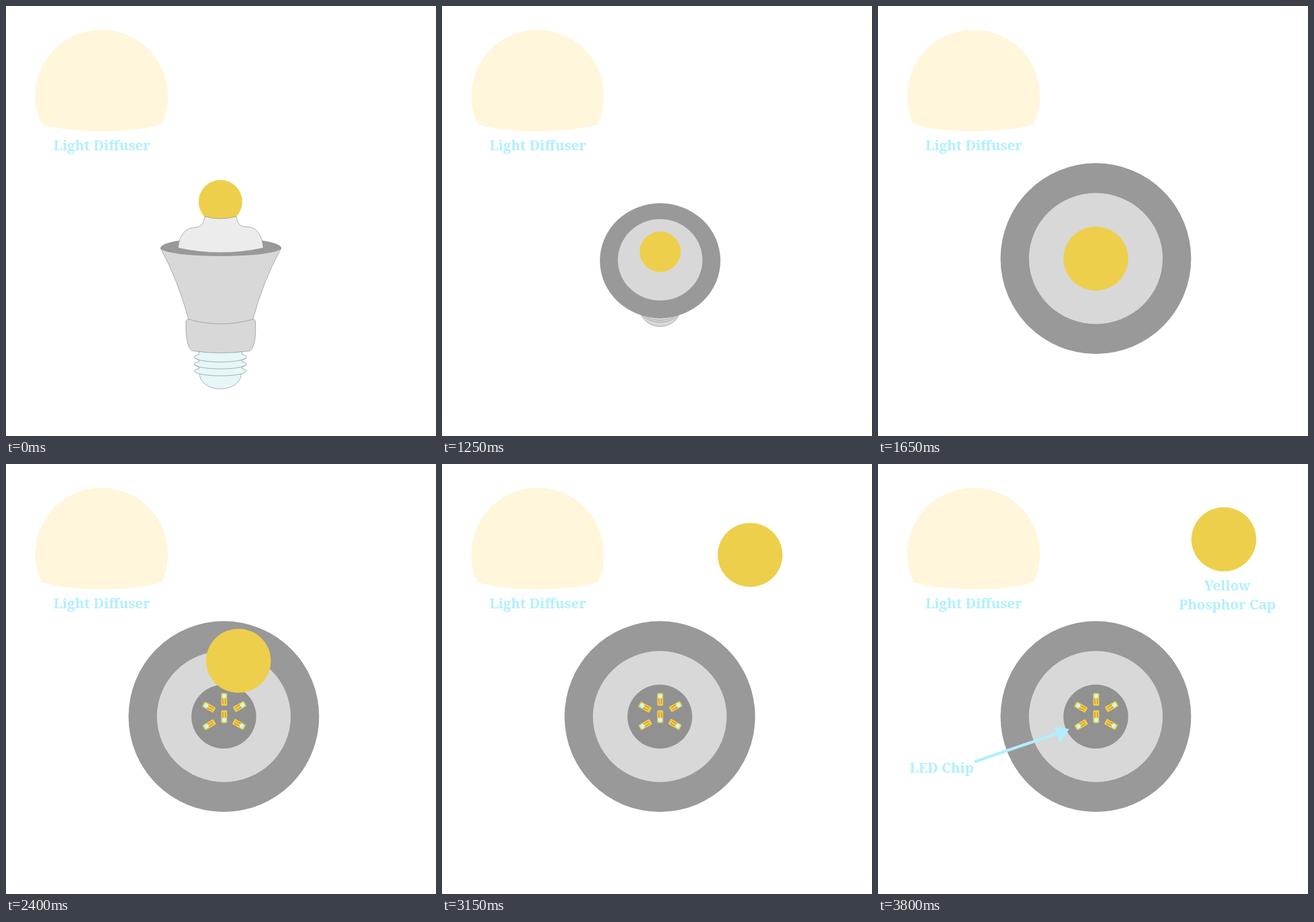
Animation, 749 px wide and 748 px high, one loop 6800 ms. Source, as an HTML page:

```html
<!DOCTYPE html>
<html lang="en">
<head>
<meta charset="utf-8">
<title>LED bulb parts</title>
<style>
  html, body { margin: 0; width: 100%; height: 100%; overflow: hidden; background: #fff; }
  svg { display: block; width: 100%; height: 100%; }
  text { font: bold 24px "Noto Serif", serif; text-anchor: middle; fill: #b0efff; }
  .line { stroke: #999; stroke-width: .9; }
  .grey { fill: #d8d8d8; }
  .dark { fill: #999; }
  .glass { fill: #e6f6f9; }
  .yellow { fill: #edcf4c; }
</style>
</head>
<body>
<svg viewBox="0 0 749 748">
  <defs>
    <g id="chip">
      <rect class="yellow" x="-5.2" y="-11" width="10.4" height="22" rx="1.8"/>
      <path d="M-2.6-2C-4 3 0 3-2.6 8M2.4-2C.6 3 4 3 1.8 8" fill="none" stroke="#d9782b" stroke-width="1.1"/>
      <circle cy="-5.5" r="3.7" fill="#cbf8f3"/>
    </g>
  </defs>

  <path d="M62 206A115.5 115.5 0 1 1 271 206Q229 218 166.500 218Q104 218 62 206Z" fill="#fff6dc"/>
  <text x="167" y="251">Light Diffuser</text>

  <g id="upright">
    <g class="glass line">
      <path d="M337 639C339 675 408 675 410 639Z"/>
      <path d="M336 601V606Q328 608 328 611Q328 613 336 616V619Q328 620 328 623Q328 625 336 628V631Q328 632 328 635C333 646 414 646 419 635Q419 632 411 631V628Q419 625 419 623Q419 620 411 619V616Q419 613 419 611Q419 608 411 606V601Z"/>
      <path d="M328 611C333 622 414 622 419 611M328 623C333 634 414 634 419 623" fill="none"/>
    </g>
    <path class="grey line" d="M318 545Q313 545 313.500 552C313 575 316 598 326 600Q374 607 424 600C432 598 436 575 434.500 552Q435 545 430 545Z"/>
    <path class="grey line" d="M269 421Q300 478 318 545Q374 561 430 545Q448 478 479.500 421Z"/>
    <path class="dark" d="M269 421A105 18 0 0 1 479.500 421A105 14 0 0 1 269 421Z"/>
    <ellipse class="yellow" cx="373.500" cy="340.500" rx="38" ry="38"/>
    <path class="line" fill="#ececec" d="M346 366Q374 374 401 366C404 378 406 384 419 384C438 384 447 402 448 421Q374 437 300 421C301 402 311 386 328 385.500C340 385 345 377 346 366Z"/>
  </g>

  <g id="tilted">
    <g id="base" class="line">
      <ellipse id="tip" rx="36"/>
      <ellipse id="thread3" rx="45"/>
      <ellipse id="thread2" rx="45"/>
      <ellipse id="thread1" rx="45"/>
    </g>
    <path id="collar" class="grey line"/>
    <path id="cone" class="grey line"/>
    <ellipse id="rim" class="dark" rx="105"/>
    <path id="cap" class="grey line"/>
  </g>

  <g id="chips">
    <ellipse cx="379.400" cy="439.400" rx="56.400" ry="55.600" fill="#919191"/>
    <use href="#chip" transform="translate(380 409.500)"/>
    <use href="#chip" transform="translate(380 439.500) rotate(180)"/>
    <use href="#chip" transform="translate(353.500 423) rotate(-60)"/>
    <use href="#chip" transform="translate(407 422) rotate(60)"/>
    <use href="#chip" transform="translate(354 453.500) rotate(-120)"/>
    <use href="#chip" transform="translate(405.800 453) rotate(120)"/>
  </g>

  <g id="ball">
    <ellipse class="yellow" rx="35.700" ry="35.200"/>
    <path id="seam" class="line" fill="none" d="M-28 25Q0 44 28 25"/>
  </g>

  <g id="labels">
    <text x="608.500" y="220">Yellow</text>
    <text x="608.500" y="253">Phosphor Cap</text>
    <text x="111" y="537">LED Chip</text>
    <path d="M168 518L316 467.500" stroke="#b0efff" stroke-width="5"/>
    <path d="M333 461L304 457Q311 463 312 469Q314 476 316 486Z" fill="#b0efff"/>
  </g>
</svg>
<script>
const LOOP = 6800, STEP = 50;
const TILT_START = 1000, LIFT_START = 2150;
const TILT_STEPS = 14, FACING_STEP = 8, LIFT_STEPS = 26, FADE_STEPS = 8;
const el = Object.fromEntries([...document.querySelectorAll('[id]')].map(e => [e.id, e]));

const clamp = v => Math.min(1, Math.max(0, v));
const mix = (a, b, t) => a + (b - a) * t;
const set = (e, attrs) => { for (const k in attrs) e.setAttribute(k, attrs[k]); };
const show = (e, on) => { e.style.display = on ? '' : 'none'; };
const stepAt = (time, start) => Math.max(0, Math.floor((time - start) / STEP) + 1);
const bezier = (a, b, c, d, t) => {
  const u = 1 - t;
  return a * u ** 3 + 3 * b * u * u * t + 3 * c * u * t * t + d * t ** 3;
};

// Bulb tipped toward the viewer: rings flatten by sin, heights shorten by cos.
function drawTilt(n) {
  const angle = Math.min(90, 8.25 + 10.65 * n) * Math.PI / 180;
  const s = Math.sin(angle), c = Math.max(0, Math.cos(angle));
  const turn = clamp((n - 1) / 5), settle = clamp((n - 6) / 8);
  const x = mix(mix(373.5, 380, turn), 379.4, settle);
  const y = mix(mix(428, 443, turn), 439.3, settle);
  const scale = mix(1, 1.581, clamp((n - FACING_STEP) / (TILT_STEPS - FACING_STEP)));
  const place = (px, py) => `translate(${px} ${py}) scale(${scale})`;

  set(el.tilted, { transform: place(x, y) });
  show(el.base, n < FACING_STEP);
  show(el.collar, n < FACING_STEP);
  show(el.cone, n < FACING_STEP);

  set(el.base, { fill: n < 5 ? '#e6f6f9' : '#d8d8d8' });
  set(el.tip, { cy: 221 * c ** .85, ry: Math.hypot(35 * s, 16 * c) });
  [187, 199, 210].forEach((h, i) => set(el['thread' + (i + 1)], { cy: h * c, ry: 45 * s }));

  const neck = 120 * c, foot = 179 * c;
  set(el.collar, { d: `M-57 ${neck}C-68 ${neck - 8 * c} -65 ${foot - 18 * c} -45 ${foot}
    A45 ${45 * s} 0 0 0 45 ${foot}C65 ${foot - 18 * c} 68 ${neck - 8 * c} 57 ${neck}Z` });
  set(el.cone, { d: `M-105 0Q-74 ${neck * .45} -57 ${neck}
    A57 ${57 * s} 0 0 0 57 ${neck}Q74 ${neck * .45} 105 0Z` });
  set(el.rim, { ry: 105 * s });

  const capY = -9 * c * c, low = 73.7 * s * mix(1, .978, settle);
  set(el.cap, { d: `M-73.700 ${capY}A73.700 ${Math.hypot(low, 45 * c)} 0 0 1 73.700 ${capY}
    A73.700 ${low} 0 0 1 -73.700 ${capY}Z`, 'stroke-opacity': n < 5 ? 1 : 0 });

  set(el.ball, { transform: place(x, y - 91 * c ** 1.5 * scale) });
}

function draw(time) {
  const tilt = Math.min(TILT_STEPS, stepAt(time, TILT_START));
  const lift = stepAt(time, LIFT_START);
  show(el.upright, !tilt);
  show(el.tilted, tilt);
  show(el.ball, tilt);
  show(el.seam, tilt < 3);
  show(el.chips, lift);
  if (tilt) drawTilt(tilt);
  if (lift) {
    const t = clamp(lift / LIFT_STEPS);
    const x = bezier(379.4, 405, 479, 602.4, t), y = bezier(439.4, 296, 158, 131, t);
    set(el.ball, { transform: `translate(${x} ${y}) scale(1.581)` });
  }
  el.labels.style.opacity = clamp((lift - LIFT_STEPS) / FADE_STEPS);
}

const start = performance.now();
function tick() {
  draw((performance.now() - start) % LOOP);
  requestAnimationFrame(tick);
}
tick();
</script>
</body>
</html>
```
